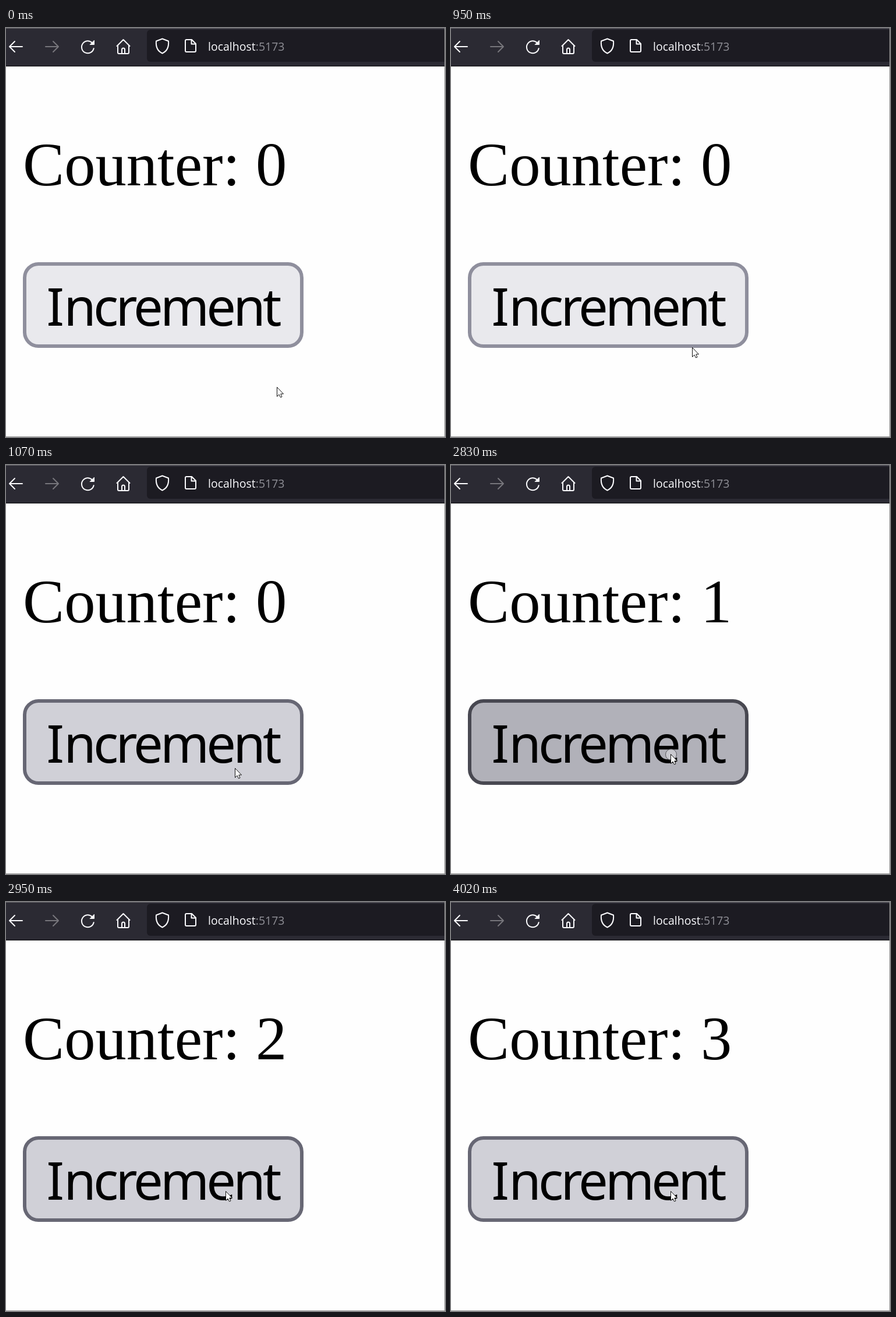
An HTML page for the animation above (5.28 s loop, 754 by 702 pixels).

```html
<!DOCTYPE html>
<html lang="en">
<head>
<meta charset="utf-8">
<title>Counter</title>
<style>
  html, body { margin: 0; width: 100%; height: 100%; overflow: hidden; background: #fefefe; }
  svg { display: block; }
  text { white-space: pre; }
  .icon { fill: none; stroke: #fbfbfe; stroke-width: 2; stroke-linecap: round; stroke-linejoin: round; }
  .url { font: 19.5px "Open Sans", "Noto Sans", sans-serif; fill: #fbfbfe; }
  .count { font: 106.67px "Liberation Serif", serif; }
  .label { font: 90px "Noto Sans", sans-serif; letter-spacing: -4.8px; }
</style>
</head>
<body>
<svg width="754" height="702" viewBox="0 0 754 702">
  <rect width="754" height="66" fill="#2b2a33"/>
  <rect width="754" height="1" fill="#65646a"/>
  <rect y="65" width="754" height="1" fill="#0c0c0d"/>
  <rect x="242" y="3" width="530" height="55" rx="6" fill="#1c1b22"/>
  <path d="M753.5 0V702M0 701.5H754" stroke="#929292"/>

  <g class="icon">
    <path d="M28 32H6M15 23L6 32L15 41"/>
    <path d="M68 32H90M81 23L90 32L81 41" stroke="#77767c"/>
    <path d="M150.7 35A10.5 10.5 0 1 1 148 25.5"/>
    <path d="M151.5 21.5V28.5H144.5Z" fill="#fbfbfe" stroke-width="1"/>
    <path d="M190.5 31L201.5 20L212.5 31M192 30V42Q192 44 194 44H209Q211 44 211 42V30M199 43V37Q199 34.5 201.5 34.5T204 37V43"/>
    <path d="M268.5 18.5L279 22.5C280 33 276 40 268.5 43.5C261 40 257 33 258 22.5Z"/>
    <path d="M310 20H319L326 27V39Q326 41 324 41H310Q308 41 308 39V22Q308 20 310 20ZM318.5 20V27.5H326"/>
  </g>
  <text class="url" x="347" y="39">localhost<tspan fill="#8f8f96">:5173</tspan></text>

  <text class="count" id="count" x="29" y="270"></text>
  <rect id="button" x="32" y="405" width="476" height="141" rx="23.67" stroke-width="6"/>
  <text class="label" x="69.5" y="511">I<tspan dx="4">ncrement</tspan></text>

  <circle id="ring" cx="378" cy="497" r="9.5" fill="#fff" fill-opacity=".3" stroke="#55555c"/>
  <path id="cursor" d="M.5 .5V16.5L4 13L6.5 18L9 17L6.8 12H11.5Z" fill="#fff" stroke="#111"/>
</svg>
<script>
const LOOP = 5280;
const $ = id => document.getElementById(id);

// Value of the last [time, value] step reached
const at = (steps, t) => steps.filter(([start]) => start <= t).pop()[1];

const looks = {
  idle: ['#e9e9ed', '#8f8f9d'],
  hover: ['#d0d0d7', '#676774'],
  pressed: ['#b1b1b9', '#484851']
};
const pointer = [
  [0, [465, 616]], [530, [460, 611]], [650, [453, 604]], [800, [440, 586]],
  [950, [414, 548]], [1070, [393, 520]], [1220, [384, 507]], [1340, [377, 496]]
];
const button = [
  [0, 'idle'], [1070, 'hover'], [2830, 'pressed'], [2950, 'hover'],
  [3900, 'pressed'], [4020, 'hover']
];
const ring = [[0, false], [1640, true], [1770, false], [2830, true], [2950, false]];
const count = [[0, 0], [1640, 1], [2950, 2], [4020, 3]];

function draw() {
  const t = performance.now() % LOOP;
  const [fill, stroke] = looks[at(button, t)];
  $('button').setAttribute('fill', fill);
  $('button').setAttribute('stroke', stroke);
  $('count').textContent = `Counter: ${at(count, t)}`;
  $('ring').style.display = at(ring, t) ? '' : 'none';
  $('cursor').setAttribute('transform', `translate(${at(pointer, t)})`);
  requestAnimationFrame(draw);
}
draw();
</script>
</body>
</html>
```
